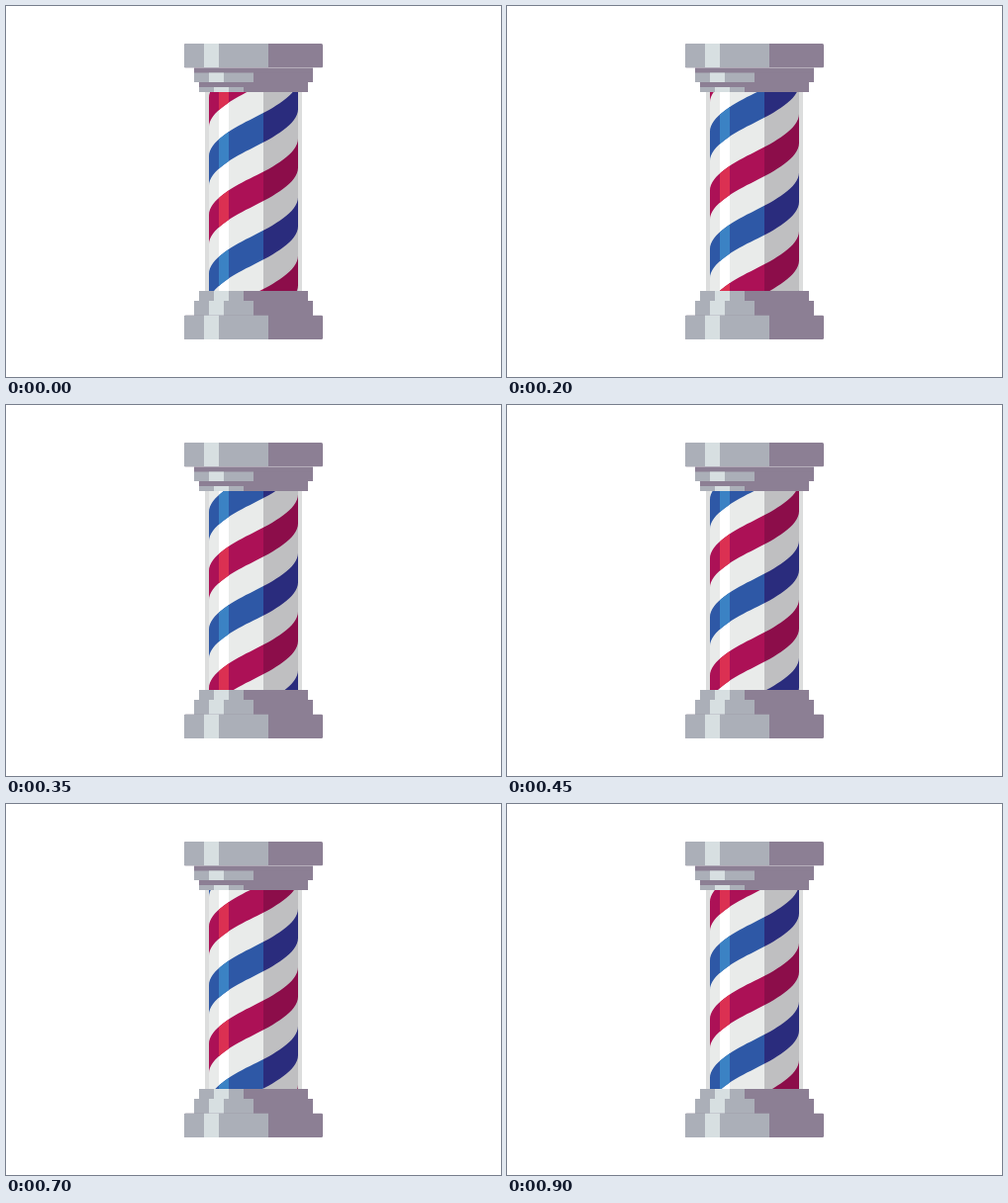
Animation, 500 px wide and 375 px high, one loop 950 ms. Source, as an HTML page with a canvas:

```html
<!DOCTYPE html>
<html lang="en">
<head>
<meta charset="utf-8">
<title>Barber pole</title>
<style>
html, body { margin: 0; width: 100%; height: 100%; overflow: hidden; background: #fff; }
canvas { display: block; }
</style>
</head>
<body>
<canvas id="stage" width="500" height="375"></canvas>
<script>
const ctx = document.getElementById("stage").getContext("2d");

const LOOP = 950, STEP = 50;
const LEFT = 205, RIGHT = 295, TOP = 87, BOTTOM = 288;
const PERIOD = 118.6, BAND = PERIOD / 4, RISE = 77.4;

const GLASS = ["#e9ebea", "#ffffff", "#bfbfc1"];
const BLUE = ["#2e58a6", "#3b82c4", "#2a2c7d"];
const RED = ["#ac1156", "#db3052", "#8c0d4a"];
const METAL = "#abafb8", SHINE = "#d7dfe1", SHADE = "#8c7f94";

function rect(color, x1, y1, x2, y2) {
  ctx.fillStyle = color;
  ctx.fillRect(x1, y1, x2 - x1, y2 - y1);
}

// Base tone with a highlight and a shaded side
function fillTones([base, light, dark]) {
  rect(base, LEFT, TOP, 260, BOTTOM);
  rect(light, 215, TOP, 225, BOTTOM);
  rect(dark, 260, TOP, RIGHT, BOTTOM);
}

// Adds a band whose upper left corner is at height y
function addBand(y) {
  const mid = (LEFT + RIGHT) / 2, half = RISE / 2;
  const low = y + BAND, end = y - RISE, lowEnd = low - RISE;
  ctx.moveTo(LEFT, y);
  ctx.bezierCurveTo(LEFT, y - 15, mid - 20, y - half + 9.8, mid, y - half);
  ctx.bezierCurveTo(mid + 20, y - half - 9.8, RIGHT, end + 15, RIGHT, end);
  ctx.lineTo(RIGHT, lowEnd);
  ctx.bezierCurveTo(RIGHT, lowEnd + 15, mid + 20, low - half - 9.8, mid, low - half);
  ctx.bezierCurveTo(mid - 20, low - half + 9.8, LEFT, low - 15, LEFT, low);
  ctx.closePath();
}

function stripes(tones, offset) {
  ctx.save();
  ctx.beginPath();
  for (let i = -1; i < 4; i++) addBand(offset + i * PERIOD);
  ctx.clip();
  fillTones(tones);
  ctx.restore();
}

function ledge(left, y1, y2, shineX, metalEnd) {
  rect(SHADE, left, y1, 500 - left, y2);
  rect(METAL, left, y1, metalEnd, y2);
  rect(SHINE, shineX, y1, shineX + 15, y2);
}

function plate(y1, y2) {
  ctx.save();
  ctx.beginPath();
  ctx.roundRect(180, y1, 140, y2 - y1, 1.5);
  ctx.clip();
  ledge(180, y1, y2, 200, 265);
  ctx.restore();
}

function caps() {
  plate(38, 62.5);
  rect(SHADE, 190, 62.5, 310, 77);
  ledge(190, 67.5, 77, 205, 250);
  rect(SHADE, 195, 77, 305, 87);
  ledge(195, 82, 87, 210, 240);

  ledge(195, 288, 298, 210, 240);
  ledge(190, 298, 313, 205, 250);
  plate(312.5, 337);
}

function draw(time) {
  const step = Math.floor((time % LOOP) / STEP);
  const offset = 152 - PERIOD * step * STEP / LOOP;
  rect("#ffffff", 0, 0, 500, 375);
  rect("#dcdddd", 201, TOP, 299, BOTTOM);
  fillTones(GLASS);
  stripes(BLUE, offset);
  stripes(RED, offset + PERIOD / 2);
  caps();
}

const start = performance.now();
function tick() {
  draw(performance.now() - start);
  requestAnimationFrame(tick);
}
tick();
</script>
</body>
</html>
```
